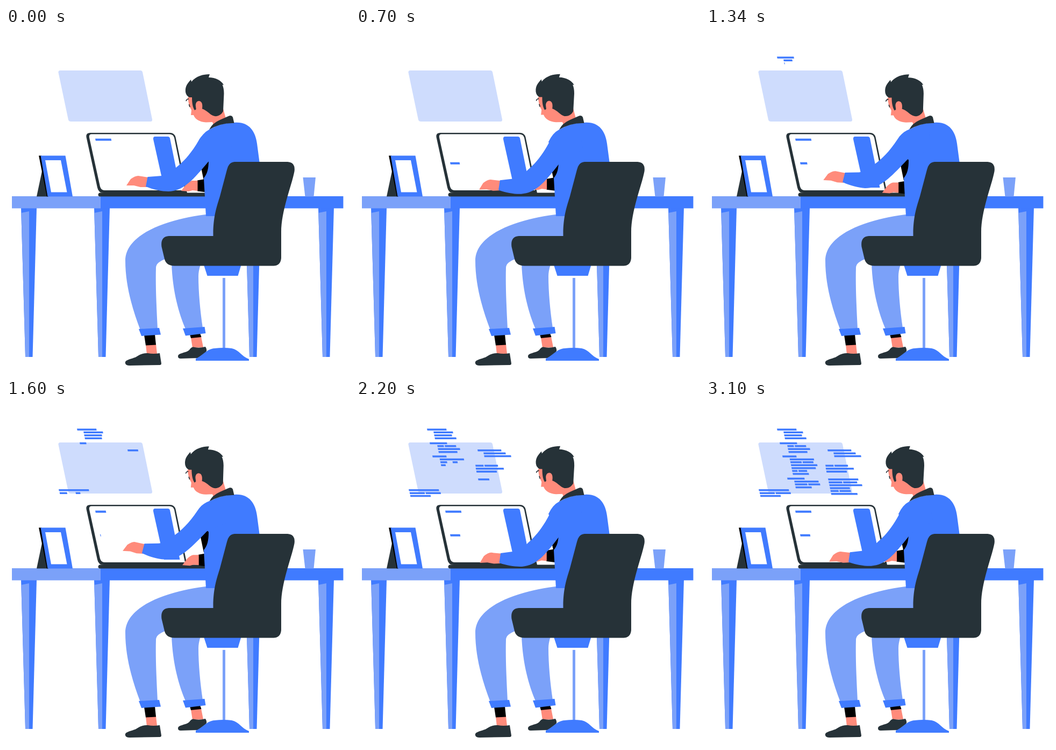
An HTML page that plays this animation: 640 by 640 pixels, repeating every 3140 ms.

```html
<!DOCTYPE html>
<html lang="en">
<head>
<meta charset="utf-8">
<title>Working at a desk</title>
<style>
  html, body { margin: 0; width: 100%; height: 100%; overflow: hidden; background: #fff; }
  svg { display: block; width: 100%; height: 100%; }
  .blue { fill: #407bff; }
  .light { fill: #7ba1f9; }
  .dark { fill: #263238; }
  .skin { fill: #ff8b7b; }
  .white { fill: #fff; }
</style>
</head>
<body>
<svg viewBox="0 0 640 640" xmlns="http://www.w3.org/2000/svg">
  <defs>
    <g id="leg">
      <path class="blue" d="M28 335H57L49.500 612H36Z"/>
      <path class="light" d="M28.300 344L43 341V612H36Z"/>
    </g>
  </defs>

  <path fill="#cedcfd" d="M101 79H250Q253 79 254 82L272 170Q272.500 174 269 174H121Q117 174 116 171L97.500 83Q97 79 101 79Z"/>
  <g id="code" class="blue"></g>

  <use href="#leg"/><use href="#leg" x="136"/><use href="#leg" x="417"/><use href="#leg" x="553"/>
  <path class="blue" d="M176 313H627.500V335.500H176Z"/>
  <path class="light" d="M11 313H176V335.500H11Z"/>
  <path class="light" d="M552.500 278H576L572.500 313.500H556.500Z"/>

  <g id="photo">
    <path class="dark" d="M67 266L57 313.500H79Z"/>
    <path d="M61 237.500H66L79 313.500H76Z"/>
    <path class="blue" d="M64.500 237.500H110.500L124 313.500H77.500Z"/>
    <path class="white" d="M73 246H102L113.500 305.500H84Z"/>
  </g>

  <g id="laptop">
    <path class="dark" d="M157 195H305Q313 195 315.500 203L337 307H182Q172 307 170 297L149.500 203Q148.500 195 157 195Z"/>
    <path class="white" d="M159 197.500H304Q311 197.500 313 204L333 302H183Q177 302 175 295L155 204Q154 197.500 159 197.500Z"/>
    <path class="dark" d="M175 306.500H375V313.500H174Q171 313 171.500 310Q172 306.500 175 306.500Z"/>
    <path class="blue" d="M277 202H301Q304 202 305 205L323.500 297H294L274 207Q273.500 202 277 202Z"/>
    <path id="lineA" class="blue"/>
    <path id="lineB" class="blue"/>
  </g>

  <g id="legs">
    <path class="light" d="M308 438C310 490 321 530 334 560L366 558C361 525 358 490 358 462Q358 452 362 440Z"/>
    <path class="skin" d="M344 576L363 574L367 594L347 595Z"/>
    <path d="M342 570L361 568L363.500 575L344 577Z"/>
    <path class="blue" d="M329 559L369.500 556L371.500 568L334 572.500Z"/>
    <path class="dark" d="M320 611C320 604 335 605 341 599Q346 592 351 594Q360 596 371 593Q376 600 370 605L357 614L325 615Q320 615 320 611Z"/>
    <path class="light" d="M392 345C330 349 222 374 222 433C222 478 235 523 250 562L282 560C280 520 278 480 279 446C280 435 292 432 300 428L400 400Z"/>
    <path class="skin" d="M260 589L279 588L281 606L262 607Z"/>
    <path d="M257 571L277 570L279 589.500L260 590.500Z"/>
    <path class="blue" d="M247 560L285 558L288 570.500L252 573Z"/>
    <path class="dark" d="M222 624C220 617 234 616 242 612Q254 604 264 605Q274 607 286 605L289 624Q289 627 286 627L230 628Q223 628 222 624Z"/>
  </g>

  <path class="blue" d="M368 441H437.500L431.500 461H374.500Z"/>
  <path class="light" d="M403 465H408V598H403Z"/>
  <path class="blue" d="M353 619V615C366 610 373 597 388 596Q405 594 420 596C434 599 438 611 452 616V619Z"/>

  <g id="farArm">
    <path d="M356 283.500L376 280V306L356 303.500Z"/>
    <path class="skin" d="M326 303L335 291Q341 285 346 284L356.500 284V303L347 302L340 304Z"/>
  </g>
  <path d="M384 230L361 250L368 284L380 275Z"/>

  <g id="head">
    <path class="skin" d="M338 130L341 145L345 153L344 162L349 162C351 169 360 175 372 175.500L384 175L387 182L409 168L404 150L398 115L345 122Z"/>
    <path d="M335 136Q336 132 340 132M340.500 142L342 147" fill="none" stroke="#263238" stroke-width="1.600"/>
    <path class="dark" d="M334 119C333 108 338 103 344 96L345 100C354 89 367 86 379 86L377 92C390 92 401 98 405 106L402.500 105.500Q405.500 112 405.500 122L404 155C400 163 391 166 385 163C378 160 374 153 364 150L355 144L354 151L351 153C347 147 346 138 346 129H341Q335 126 334 119Z"/>
    <path class="skin" d="M353 146C352 139 356 135 360 136C365 137 366 143 365 150Q362 156 354 153Z"/>
  </g>

  <path class="blue" d="M378 189Q400 176 425 176C452 174 464 192 467 215L473 260L440 350H372L368 279C375 271 377 260 377 246L358 212Q366 195 378 189Z"/>
  <path class="dark" d="M378 189Q384 177 398 171L415 163.500Q420 162 422 166L424.500 177Q400 176 378 189Z"/>

  <g id="nearArm">
    <path class="skin" d="M224 293L232 281Q240 275 246 275L265 278L262 296L250 296L238 293Z"/>
    <path class="blue" d="M415 186C385 184 368 192 358 210C344 234 330 249 316 260Q303 273 290 275L263.500 277L260 295C275 301 290 304 302 304C330 303 346 285 378 247L420 226Z"/>
  </g>

  <path class="dark" d="M425 249H524Q539 250 536.500 267C531 295 512 340 512 380V428Q511 442 498 442.500H313Q298 442 295 430L289.500 407Q287 388 303 387H385.500C385 350 393 330 398 313L411 264Q414 250 425 249Z"/>
</svg>

<script>
const LOOP = 3140, CYCLE = LOOP / 3, SLANT = 0.2;
const $ = id => document.getElementById(id);
const clamp = x => Math.max(0, Math.min(1, x));
const ease = x => (1 - Math.cos(Math.PI * clamp(x))) / 2;

// Keys are [ms within a typing cycle, value].
const swing = [[0, 2.6], [106, 3], [293, -2.9], [420, -3.8], [546, -3.6], [700, 2.35], [793, 1.2], [1006, 2.35], [CYCLE, 2.6]];
const typeA = [[0, 1], [440, 1], [546, 0.67], [690, 0], [770, 0], [793, 0.1], [990, 1], [CYCLE, 1]];
const typeB = [[0, 1], [200, 1], [293, 0.7], [546, 0.05], [700, 0.95], [793, 1], [CYCLE, 1]];

function sample(keys, t) {
  const i = Math.max(1, keys.findIndex(k => k[0] >= t));
  const [t0, a] = keys[i - 1], [t1, b] = keys[i];
  return a + (b - a) * ease((t - t0) / (t1 - t0));
}

const bar = (x, y, w, h = 3.5) =>
  w < 0.3 ? '' : `M${x} ${y}h${w}l${h * SLANT} ${h}h${-w}Z`;

// Each block: top, x of the first row, x of the other rows, row widths.
const columns = [
  { start: 1150, step: 92, time: 220, blocks: [
    [53.2, 132, 143, '36|36|33|40'],
    [78.7, 137, 150, '32|12 21|41|35'],
    [103.3, 142, 154.5, '26|45|21 20|49|45|10 16|30'],
    [144.5, 151, 163, '32|45|23 22|30']] },
  { start: 1530, step: 102, time: 160, blocks: [
    [92, 226, 236, '44|41|50'],
    [120.6, 222, 221.500, '15 25|52|38'],
    [146, 227, 227, '56|25 26|61|37|15 21|49']] },
  { start: 1430, step: 92, time: 160, blocks: [
    [166, 98, 98.500, '56|28 28|38']] }
];

const bars = [];
for (const { start, step, time, blocks } of columns) {
  let order = 0;
  for (const [top, first, rest, rows] of blocks) {
    rows.split('|').forEach((row, r) => {
      let x = r ? rest + r * 1.1 : first;
      row.split(' ').map(Number).forEach((w, part) => {
        const path = document.createElementNS('http://www.w3.org/2000/svg', 'path');
        $('code').append(path);
        bars.push({ path, x, y: top + r * 5.4, w, begin: start + order * step + part * 30, time });
        x += w + 1.8;
      });
      order++;
    });
  }
}

function draw(t) {
  const phase = t % CYCLE, intro = ease(t / 106);
  const angle = sample(swing, phase) * intro;
  $('nearArm').setAttribute('transform', `rotate(${-angle} 418 175)`);
  $('farArm').setAttribute('transform', `translate(${-0.6 * angle} ${-1.2 * angle})`);
  $('head').setAttribute('transform', `rotate(${0.23 * angle} 395 175)`);
  $('lineA').setAttribute('d', bar(166, 205.8, 29.5 * sample(typeA, phase), 4));
  $('lineB').setAttribute('d', bar(175, 249.8, 18.5 * sample(typeB, phase) * intro, 4));
  for (const b of bars) {
    b.path.setAttribute('d', bar(b.x, b.y, b.w * clamp((t - b.begin) / b.time)));
  }
}

const origin = performance.now();
function frame() {
  draw((performance.now() - origin) % LOOP);
  requestAnimationFrame(frame);
}
frame();
</script>
</body>
</html>
```
